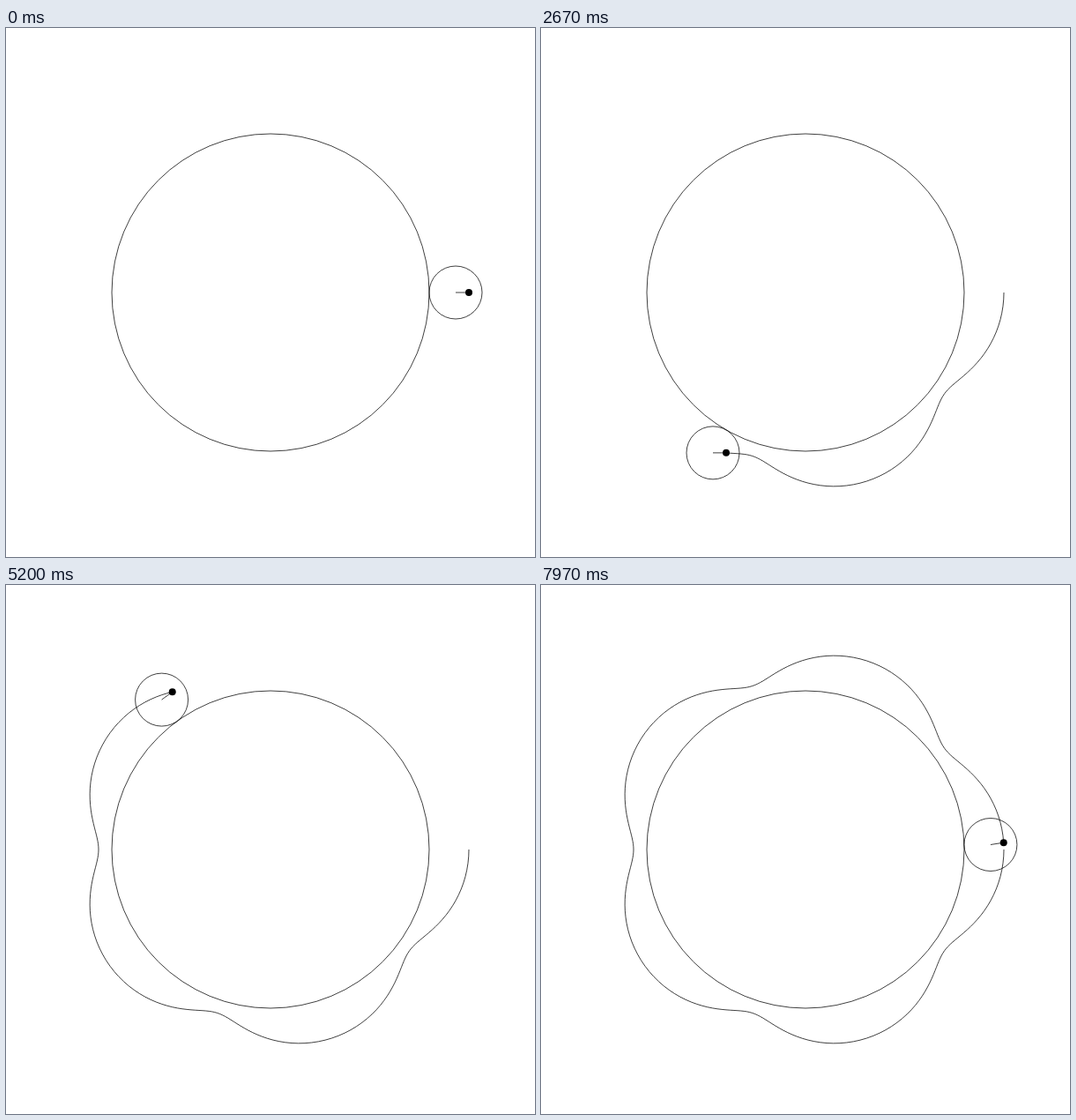
Write an HTML page with a canvas that moves like this. It is 600 px wide and 600 px high and loops after 8010 ms.

```html
<!DOCTYPE html>
<html lang="en">
<head>
<meta charset="utf-8">
<title>Epitrochoid</title>
<style>
  html, body { margin: 0; width: 100%; height: 100%; overflow: hidden; background: #fff; }
  canvas { display: block; }
</style>
</head>
<body>
<canvas id="stage" width="600" height="600"></canvas>
<script>
const ctx = document.getElementById('stage').getContext('2d');
const LOOP = 8010, STEPS = 240, CENTER = 300;
const FIXED = 180, ROLLER = 30, ARM = 15, DOT = 4;

const polar = (x, y, radius, angle) =>
  [x + radius * Math.cos(angle), y + radius * Math.sin(angle)];
const angleAt = step => step / STEPS * 2 * Math.PI;
const hub = step => polar(CENTER, CENTER, FIXED + ROLLER, angleAt(step));
const pen = step => polar(...hub(step), ARM, 6 * angleAt(step));

function circle(x, y, radius) {
  ctx.beginPath();
  ctx.arc(x, y, radius, 0, 2 * Math.PI);
}

function polyline(points) {
  ctx.beginPath();
  points.forEach(p => ctx.lineTo(...p));
  ctx.stroke();
}

// Steps last a thirtieth of a second, rounded to 10 ms.
const stepAt = time =>
  Math.min(STEPS - 1, Math.floor((Math.floor(time / 10) + 0.5) * 0.3));

function draw(step) {
  ctx.fillStyle = '#fff';
  ctx.fillRect(0, 0, 600, 600);
  ctx.fillStyle = ctx.strokeStyle = '#000';
  ctx.lineWidth = 0.75;
  ctx.lineJoin = 'round';

  circle(CENTER, CENTER, FIXED);
  ctx.stroke();
  circle(...hub(step), ROLLER);
  ctx.stroke();
  if (step) polyline(Array.from({ length: step + 1 }, (_, i) => pen(i)));
  polyline([hub(step), pen(step)]);
  circle(...pen(step), DOT);
  ctx.fill();
}

const start = performance.now();
function tick() {
  draw(stepAt((performance.now() - start) % LOOP));
  requestAnimationFrame(tick);
}
tick();
</script>
</body>
</html>
```
